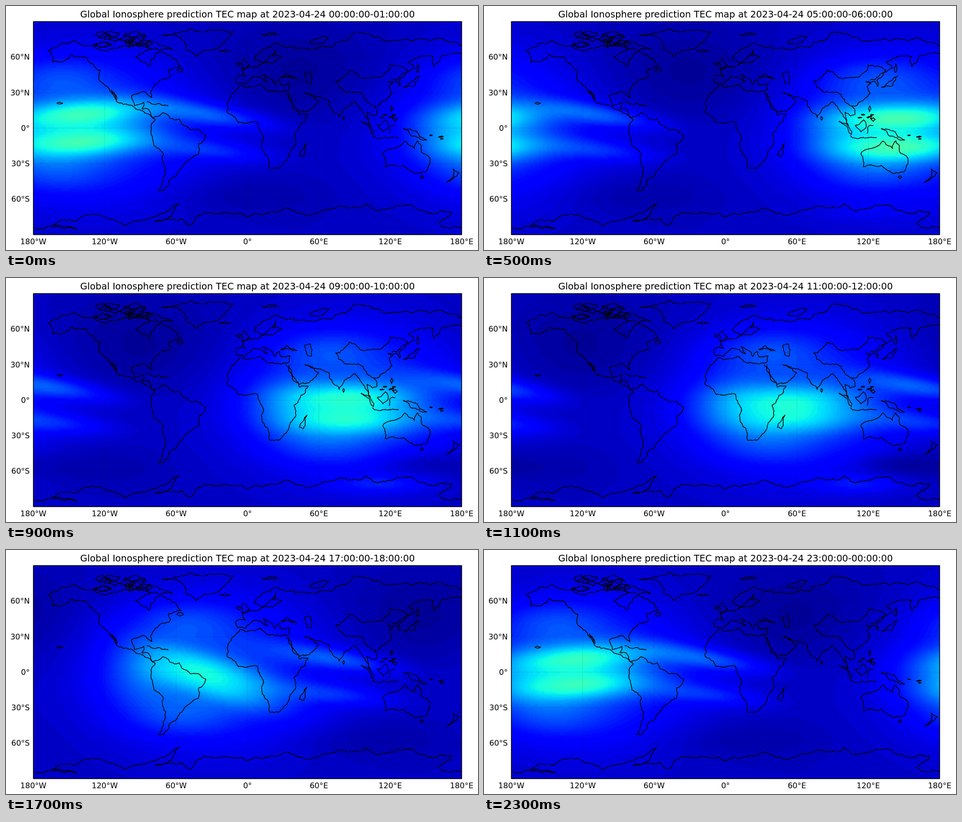
Write an HTML page with a canvas that moves like this. It is 983 px wide and 510 px high and loops after 2400 ms.

```html
<!DOCTYPE html>
<html>
<head>
<meta charset="utf-8">
<style>
html, body { margin: 0; width: 100%; height: 100%; overflow: hidden; background: #fff; }
canvas { display: block; }
</style>
</head>
<body>
<canvas id="stage" width="983" height="510"></canvas>
<script>
const ctx = document.getElementById('stage').getContext('2d');
const LEFT = 57, TOP = 32.5, WIDTH = 892, HEIGHT = 445.5;

// Coastlines: a few points each, roughened by midpoint displacement
const land = new Path2D();
let seed = 7;
const random = () => (seed = seed * 16807 % 2147483647) / 2147483647;

function rough(x0, y0, x1, y1) {
  const dx = x1 - x0, dy = y1 - y0;
  if (Math.hypot(dx, dy) < 4) return land.lineTo(x1, y1);
  const k = (random() - .5) * .34;
  const mx = (x0 + x1) / 2 - dy * k, my = (y0 + y1) / 2 + dx * k;
  rough(x0, y0, mx, my);
  rough(mx, my, x1, y1);
}

function coast(points) {
  const p = points.split(' ').map(Number);
  land.moveTo(p[0], p[1]);
  for (let i = 2; i < p.length; i += 2) rough(p[i - 2], p[i - 1], p[i], p[i + 1]);
}

function island(points) {
  coast(points + ' ' + points.split(' ', 2).join(' '));
}

function islet(x, y, rx, ry) {
  island([x - rx, y, x, y - ry, x + rx, y, x, y + ry].join(' '));
}

function scatter(count, x, y, w, h, size) {
  while (count--) islet(x + random() * w, y + random() * h, size * (.5 + random()), size * (.2 + random() * .3));
}

// The Americas
coast('114 78 168 83 268 82 302 89 270 107 299 126 313 99 341 103 365 126 338 133 343 145 316 161 301 180 304 192 290 180 262 187 267 208 287 201 283 215 297 216 303 232');
coast('303 232 325 224 361 236 379 254 416 270 401 310 382 322 360 345 340 364 329 386 318 386 328 310 302 266 311 238');
coast('311 238 270 215 244 206 219 176 230 197 216 177 196 158 196 134 166 107 137 102 97 117 88 93 114 78');
island('383 48 473 54 448 80 412 92 396 106 374 92 372 74 324 61');
island('280 72 318 80 347 91 322 92');
scatter(16, 198, 56, 104, 26, 15);
coast('293 200 319 204 338 209');
islet(363, 134, 7, 4);
islet(112, 203, 6, 2);
// Europe
coast('949 83 845 74 762 62 686 76 677 86 602 90 600 84 567 79 528 97 517 110 535 118 549 106 563 91 556 104 574 106 553 119 507 128 492 133 499 147 480 147 483 163 500 163 515 147 529 149 545 158 535 143 560 164 569 153 572 164 592 163 589 176');
island('490 131 507 124 498 111 491 114 493 124');
islet(484, 121, 5, 4);
islet(456, 94, 12, 3);
islet(550, 59, 18, 3);
island('632 79 672 64 645 79');
island('622 141 634 138 636 163 627 161');
island('572 150 585 141 606 152');
// Africa
coast('589 176 550 178 530 163 488 166 462 201 460 220 484 244 524 243 537 277 533 294 549 339 567 339 590 308 603 290 600 266 629 226 611 228 584 181');
island('627 286 619 315 611 312');
// Asia
coast('589 182 611 222 640 210 651 198 622 181 673 198 694 233 701 222 727 200 748 230 759 250 752 222 763 230 773 226 766 209');
coast('766 209 785 199 804 183 798 169 806 162 795 158 814 157 820 168 819 155 851 130 838 118 890 105 891 127 909 103 949 98');
coast('804 155 837 134 800 123 785 145 745 152 714 134 686 157 705 179 744 185 752 201 766 209');
island('827 170 850 155 862 146 851 167');
islet(857, 130, 3, 9);
islet(703, 235, 2, 4);
islet(803, 215, 3, 6);
islet(811, 237, 4, 4);
scatter(9, 782, 226, 30, 10, 3);
// Indonesia, Australia, New Zealand
island('739 241 766 262 765 269');
island('773 250 790 238 796 248 785 263');
coast('763 271 786 275 818 275');
coast('798 267 800 252 811 250');
island('827 256 853 261 876 280 845 272');
island('785 309 790 336 827 333 857 350 874 347 883 318 858 282 851 298 831 282 806 298');
islet(866, 358, 4, 3);
island('931 340 944 349 917 369 932 356');
scatter(4, 885, 270, 25, 10, 3);
// Antarctica
coast('57 464 148 465 97 458 130 448 175 437 320 435 360 412 345 440 310 451 385 457 465 433 590 424 673 426 715 422 850 420 928 431 902 452 949 464');

// Blobs of [x, y, radius x, radius y, height, slope], carried west with the sun
function blobs(hour) {
  const wave = peak => Math.cos((hour - peak) * Math.PI / 12);
  const noon = 165 - hour * WIDTH / 24;
  const split = wave(3), middle = 264 - 10 * wave(-1), gap = 25 + 7 * split;
  const crest = .18 + .06 * split;
  const tilt = .3 * Math.exp(-(((hour - 17) / 2) ** 2)) - .06 * Math.max(0, wave(0));
  const south = Math.max(0, wave(10));
  return [
    [noon, 255, 235, 150, .14],
    [noon, middle - gap, 140, 30, crest, tilt],
    [noon, middle + gap, 140, 31, crest, tilt],
    [noon - 135, 265, 85, 60, .08],
    [noon + 265, 228, 125, 22, .125, .16],
    [noon + 265, 302, 120, 22, .08, .1],
    [noon - 60, 150, 115, 42, .065],
    [noon - 60, 345, 110, 42, .06],
    [noon + 446, 140, 200, 100, -.035],
    [noon + 330, 395, 150, 40, -.025],
    [780, 431, 90, 18, .07 * south],
    [860, 388, 90, 22, -.04 * south]
  ];
}

function level(list, x, y) {
  let v = .055;
  for (const [cx, cy, rx, ry, height, slope = 0] of list) {
    const dx = ((x - cx + WIDTH * 2.5) % WIDTH) - WIDTH / 2;
    const u = dx / rx, w = (y - cy - slope * dx) / ry, d = u * u + w * w;
    if (d < 8) v += height * Math.exp(-d);
  }
  return Math.round(Math.max(.01, v) * 100) / 100;
}

const COLS = 298, ROWS = 149;
const field = document.createElement('canvas');
field.width = COLS;
field.height = ROWS;
const fieldCtx = field.getContext('2d');
const image = fieldCtx.createImageData(COLS, ROWS);

function paintField(hour) {
  const list = blobs(hour), data = image.data;
  for (let i = 0; i < data.length; i += 4) {
    const col = i / 4 % COLS, row = Math.floor(i / 4 / COLS);
    const v = level(list, LEFT + (col + .5) * WIDTH / COLS, TOP + (row + .5) * HEIGHT / ROWS);
    // Lower half of the jet colour scale
    data[i] = 255 * (v - .35) / .31;
    data[i + 1] = 255 * (v - .125) / .25;
    data[i + 2] = 255 * Math.min(.5 + v / .22, 1 - (v - .34) / .31);
    data[i + 3] = 255;
  }
  fieldCtx.putImageData(image, 0, 0);
  ctx.drawImage(field, LEFT, TOP, WIDTH, HEIGHT);
}

function text(s, x, y, size, align) {
  ctx.font = size + 'px "DejaVu Sans", sans-serif';
  ctx.textAlign = align;
  ctx.fillText(s, x, y);
}

const degrees = (d, plus, minus) => Math.abs(d) + '°' + (d > 0 ? plus : d < 0 ? minus : '');
const clock = h => String(h % 24).padStart(2, '0') + ':00:00';

function line(x0, y0, x1, y1) {
  ctx.beginPath();
  ctx.moveTo(x0, y0);
  ctx.lineTo(x1, y1);
  ctx.stroke();
}

function draw(hour) {
  ctx.fillStyle = '#fff';
  ctx.fillRect(0, 0, 983, 510);
  paintField(hour);
  ctx.fillStyle = '#000';
  ctx.strokeStyle = 'rgba(0,0,0,.1)';
  ctx.lineWidth = 1;
  for (let d = -180; d <= 180; d += 60) {
    const x = LEFT + (d + 180) * WIDTH / 360;
    line(x, TOP, x, TOP + HEIGHT);
    text(degrees(d, 'E', 'W'), x, 497.5, 16, 'center');
  }
  for (let d = -60; d <= 60; d += 30) {
    const y = TOP + (90 - d) * HEIGHT / 180;
    line(LEFT, y, LEFT + WIDTH, y);
    text(degrees(d, 'N', 'S'), 49.5, y + 5.5, 16, 'right');
  }
  ctx.strokeStyle = '#000';
  ctx.lineJoin = 'round';
  ctx.lineWidth = 1.5;
  ctx.stroke(land);
  ctx.strokeRect(LEFT, TOP, WIDTH, HEIGHT);
  text(`Global Ionosphere prediction TEC map at 2023-04-24 ${clock(hour)}-${clock(hour + 1)}`, 503, 24, 19.2, 'center');
}

let shown = -1;
function tick() {
  const hour = Math.floor(performance.now() / 100) % 24;
  if (hour !== shown) draw(shown = hour);
  requestAnimationFrame(tick);
}
tick();
</script>
</body>
</html>
```
